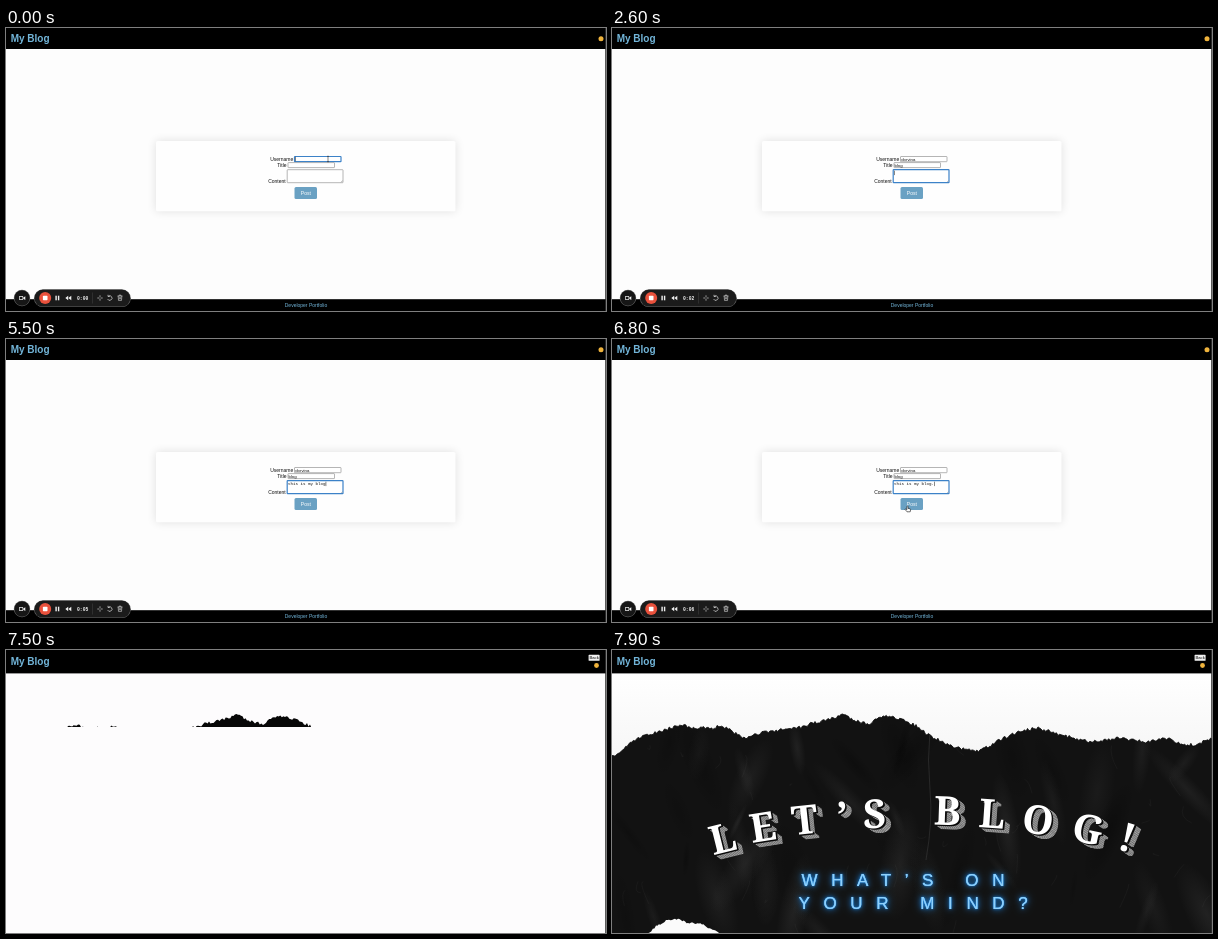
An HTML page with a canvas that plays this animation: 600x283 px, repeating every 8000 ms.

```html
<!DOCTYPE html>
<html lang="en">
<head>
<meta charset="utf-8">
<title>My Blog</title>
<style>
html, body { margin: 0; height: 100%; overflow: hidden; background: #fdfdfd; }
canvas { display: block; width: 600px; height: 283px; }
</style>
</head>
<body>
<canvas id="stage"></canvas>
<script>
const W = 600, H = 283, LOOP = 8000;
const SANS = '"Liberation Sans", Arial, sans-serif';
const MONO = '"Liberation Mono", monospace';
const SERIF = '"Noto Serif", serif';
const BLUE = '#72b5d9';

const canvas = document.getElementById('stage');
const ctx = canvas.getContext('2d');
const scale = window.devicePixelRatio || 1;
canvas.width = W * scale;
canvas.height = H * scale;

function rect(x, y, w, h, color) {
  ctx.fillStyle = color;
  ctx.fillRect(x, y, w, h);
}
function round(x, y, w, h, r, color) {
  ctx.fillStyle = color;
  ctx.beginPath();
  ctx.roundRect(x, y, w, h, r);
  ctx.fill();
}
function disc(x, y, r, color) {
  ctx.fillStyle = color;
  ctx.beginPath();
  ctx.arc(x, y, r, 0, 7);
  ctx.fill();
}
function text(str, x, y, font, color, align = 'left') {
  ctx.font = font;
  ctx.fillStyle = color;
  ctx.textAlign = align;
  ctx.fillText(str, x, y);
}
function stroke(d, color, width) {
  ctx.strokeStyle = color;
  ctx.lineWidth = width;
  ctx.stroke(new Path2D(d));
}
function fill(d, color) {
  ctx.fillStyle = color;
  ctx.fill(new Path2D(d));
}

// ---------- Form page ----------

// keys: time of each typed character; the field has focus from `focus` to `blur`
const fields = [
  { x: 288.5, y: 128.5, w: 46.5, h: 5.2, font: `4.3px ${SANS}`, base: 132.5, pad: 0.7,
    value: 'dorvina', keys: [100, 200, 400, 500, 700, 800, 900], focus: -100, blur: 1300 },
  { x: 282, y: 134.6, w: 46.5, h: 5, font: `4.3px ${SANS}`, base: 138.6, pad: 0.5,
    value: 'blog', keys: [1800, 1900, 2200, 2300], focus: 1300, blur: 2500 },
  { x: 281.2, y: 141.7, w: 55.8, h: 13, font: `4.2px ${MONO}`, base: 146.4, pad: 0.7, area: true,
    value: 'this is my blog.', focus: 2500, blur: 7100,
    keys: [3000, 3100, 3200, 3300, 3500, 3600, 3700, 3900,
           4200, 4300, 4500, 4600, 4700, 5400, 5500, 5600] }
];

function drawField(f, t) {
  const typed = f.keys.filter(k => k <= t);
  const value = f.value.slice(0, typed.length);
  const focused = t >= f.focus && t < f.blur;
  round(f.x, f.y, f.w, f.h, 0.5, '#fff');
  ctx.strokeStyle = focused ? '#3c82c8' : '#858585';
  ctx.lineWidth = focused ? 1.2 : 0.6;
  ctx.stroke(roundPath(f));
  text(value, f.x + f.pad, f.base, f.font, '#111');
  if (f.area) stroke('M334.8 154.2L336.5 152.5M335.9 154.2L336.5 153.6', '#777', 0.4);

  const last = typed.length ? typed[typed.length - 1] : f.focus;
  if (focused && (t - last) % 1000 < 500) {
    rect(f.x + f.pad + ctx.measureText(value).width + 0.1, f.base - 3.7, 0.5, 4.4, '#111');
  }
}
function roundPath(f) {
  const p = new Path2D();
  p.roundRect(f.x, f.y, f.w, f.h, 0.5);
  return p;
}

function drawPointer(t) {
  if (t < 1700) return drawBeam(322, 131);
  if (t < 6400) return;
  const u = Math.min(1, (t - 6400) / 400), e = u * u * (3 - 2 * u);
  const x = 325 - 29.5 * e, y = 146 + 22 * e;
  if (y < 155) drawBeam(x, y);
  else drawHand(x, y);
}
function drawBeam(x, y) {
  stroke(`M${x - 1} ${y - 2.7}h2M${x} ${y - 2.7}v5.4M${x - 1} ${y + 2.7}h2`, '#333', 0.6);
}
function drawHand(x, y) {
  const d = `M${x - 0.6} ${y - 0.6}q.6 -.7 1.2 0v2l2 .5q.6 .2 .5 1l-.4 1.9h-3.2l-1.9 -2.4q.2 -.8 1 -.3l.8 .6z`;
  fill(d, '#fff');
  stroke(d, '#111', 0.6);
}

function drawRecorder(t) {
  disc(16, 270, 8.2, '#777');
  disc(16, 270, 7.7, '#161616');
  round(13, 268, 4.2, 4, 0.8, '#eee');
  round(13.7, 268.7, 2.8, 2.6, 0.4, '#161616');
  fill('M17.3 269.5l2 -1.2v3.6l-2 -1.2z', '#eee');

  round(28, 261.3, 96.8, 17.8, 8.9, '#666');
  round(28.5, 261.8, 95.8, 16.8, 8.4, '#1b1b1b');
  disc(39.2, 270, 6, '#e9513c');
  round(36.9, 267.7, 4.6, 4.6, 0.7, '#fff');
  rect(49.4, 267.7, 1.4, 4.6, '#eee');
  rect(51.9, 267.7, 1.4, 4.6, '#eee');
  fill('M62.2 267.8v4.4l-2.9 -2.2zM65.3 267.8v4.4l-2.9 -2.2z', '#eee');
  text('0:0' + Math.floor(t / 1000), 71, 271.5, `bold 4.7px ${MONO}`, '#eee');
  rect(86, 264.5, 0.5, 11, '#444');
  stroke('M91.3 270h5.4M94 267.3v5.4', '#ccc', 0.7);
  disc(94, 270, 0.9, '#1b1b1b');
  stroke('M102.2 268.3a2.3 2.3 0 1 1 -.6 2.7M102 266.8v1.7h1.8', '#ddd', 0.7);
  stroke('M111.5 268h5M113.1 268v-.9h1.8v.9M112.2 268l.3 4.4h3l.3 -4.4M113.4 269.2v2M114.6 269.2v2', '#ddd', 0.6);
}

function drawForm(t) {
  rect(0, 0, W, H, '#fdfdfd');
  rect(0, 0, W, 21, '#000');
  text('My Blog', 4.7, 13.6, `bold 10px ${SANS}`, BLUE);
  disc(595, 10.7, 2.5, '#efb33c');

  ctx.save();
  ctx.shadowColor = 'rgba(0,0,0,.12)';
  ctx.shadowBlur = 10 * scale;
  round(150, 113, 299.5, 70.3, 1.5, '#fefefe');
  ctx.restore();

  const label = `5px ${SANS}`;
  text('Username', 264.2, 132.8, label, '#111');
  text('Title', 271.3, 138.8, label, '#111');
  text('Content', 262.2, 154.8, label, '#111');
  fields.forEach(f => drawField(f, t));
  round(288.5, 159, 22.5, 12, 1.5, '#6aa1c3');
  text('Post', 299.8, 166.8, label, '#fff', 'center');

  rect(0, 271.2, W, 12, '#000');
  text('Developer Portfolio', 300, 278.6, label, BLUE, 'center');
  drawRecorder(t);
  drawPointer(t);
}

// ---------- Blog page ----------

function seeded(seed) {
  return () => (seed = (seed * 16807) % 2147483647) / 2147483647;
}

// Ragged line through a few points
function tear(points, jitter, rnd) {
  const out = [];
  for (let i = 1; i < points.length; i++) {
    const [x0, y0] = points[i - 1], [x1, y1] = points[i];
    const steps = Math.ceil((x1 - x0) / 1.6);
    for (let s = 0; s < steps; s++) {
      const u = s / steps;
      out.push([x0 + (x1 - x0) * u, y0 + (y1 - y0) * u + (rnd() - 0.5) * jitter]);
    }
  }
  out.push(points[points.length - 1]);
  return out.map(p => p.map(v => v.toFixed(1)).join(' ')).join('L');
}

const rnd = seeded(41);
const ridge = tear([
  [0, 107], [12, 98], [26, 88], [46, 82], [62, 77], [69, 74], [80, 78], [90, 77.5], [98, 79],
  [108, 76], [116, 79], [132, 88], [150, 83], [172, 79], [192, 77], [200, 73], [212, 71],
  [232, 65], [241, 70], [257, 74], [268, 66], [279, 67], [292, 70], [304, 76], [318, 86],
  [345, 98], [368, 101], [390, 89], [408, 81], [426, 78], [446, 84], [478, 92], [506, 88],
  [535, 92], [556, 88], [568, 94], [582, 95], [600, 89]
], 3, rnd);
const scrap = tear([[36, 284], [44, 276], [54, 271], [66, 269], [76, 273], [90, 274], [108, 284]], 2, rnd);
const paper = new Path2D(`M${ridge}V${H}H0Z`);
const ridgeLine = new Path2D('M' + ridge);

const creases = Array.from({ length: 46 }, () => ({
  x: rnd() * W, y: 85 + rnd() * 200, r: 18 + rnd() * 45,
  angle: Math.PI / 2 + (rnd() - 0.5) * 1.6, thin: 0.15 + rnd() * 0.25,
  tone: rnd() < 0.6 ? '70,70,70' : '0,0,0', alpha: 0.12 + rnd() * 0.2
}));
const scratches = Array.from({ length: 40 }, () => {
  const x = rnd() * W, y = 95 + rnd() * 180;
  return `M${x} ${y}q${rnd() * 10 - 5} ${rnd() * 12} ${rnd() * 20 - 10} ${rnd() * 24}`;
}).join('');

const hatch = (() => {
  const tile = document.createElement('canvas');
  tile.width = tile.height = 2;
  const c = tile.getContext('2d');
  c.fillStyle = '#c4c4c4';
  c.fillRect(0, 0, 2, 2);
  c.fillStyle = '#4a4a4a';
  c.fillRect(0, 0, 1, 1);
  c.fillRect(1, 1, 1, 1);
  return ctx.createPattern(tile, 'repeat');
})();

// character, centre x, baseline y, tilt in degrees
const headline = [
  ['L', 114, 202, -14], ['E', 153, 191, -9], ['T', 194, 184, -6], ['’', 231, 180, -3],
  ['S', 263, 178, -1], ['B', 335, 175, 2], ['L', 379, 178, 4], ['O', 424, 184, 8],
  ['G', 473, 193, 12], ['!', 511, 201, 17]
];

function drawLetter([char, x, y, tilt]) {
  const font = `bold 40px ${SERIF}`;
  const at = (offset, color) => {
    ctx.save();
    ctx.translate(x + offset, y + offset * 0.7);
    ctx.rotate(tilt * Math.PI / 180);
    text(char, 0, 0, font, color, 'center');
    ctx.restore();
  };
  for (let d = 6.5; d > 2; d -= 0.5) at(d, hatch);
  at(1.7, '#0a0a0a');
  at(1, '#0a0a0a');
  at(0, '#fff');
}

function drawNeon(str, x, y) {
  ctx.save();
  ctx.letterSpacing = '13.6px';
  ctx.shadowColor = '#1686e8';
  for (const blur of [9, 5, 2]) {
    ctx.shadowBlur = blur * scale;
    text(str, x, y, `17px ${SANS}`, '#8fd0fb');
  }
  ctx.restore();
}

function drawPaper() {
  ctx.save();
  ctx.clip(paper);
  rect(0, 60, W, H, '#121212');
  for (const c of creases) {
    ctx.save();
    ctx.translate(c.x, c.y);
    ctx.rotate(c.angle);
    ctx.scale(1, c.thin);
    const g = ctx.createRadialGradient(0, 0, 0, 0, 0, c.r);
    g.addColorStop(0, `rgba(${c.tone},${c.alpha})`);
    g.addColorStop(1, `rgba(${c.tone},0)`);
    disc(0, 0, c.r, g);
    ctx.restore();
  }
  stroke(scratches, 'rgba(120,120,120,.13)', 0.6);
  stroke('M318 80q-3 30 0 60t-4 70', 'rgba(130,130,130,.2)', 1);
  ctx.restore();
  ctx.strokeStyle = '#0a0a0a';
  ctx.lineWidth = 0.8;
  ctx.stroke(ridgeLine);
  fill(`M${scrap}Z`, '#fbfbfb');
}

function drawBlog(t) {
  rect(0, 0, W, H, '#fdfcfd');
  if (t >= 7800) {
    const sky = ctx.createLinearGradient(0, 23, 0, 105);
    sky.addColorStop(0, '#fff');
    sky.addColorStop(1, '#f6f6f6');
    rect(0, 23, W, 100, sky);
    drawPaper();
    headline.forEach(drawLetter);
    drawNeon('WHAT’S ON', 189.5, 236);
    drawNeon('YOUR MIND?', 186.5, 258.5);
  } else if (t >= 7500) {
    // Only the top rows of the picture have loaded
    ctx.save();
    ctx.beginPath();
    ctx.rect(0, 23, W, 54);
    ctx.clip();
    ctx.fillStyle = '#070707';
    ctx.fill(paper);
    ctx.restore();
  }
  rect(0, 0, W, 23.4, '#000');
  text('My Blog', 4.7, 15, `bold 10px ${SANS}`, BLUE);
  round(582.6, 4.8, 11, 6, 0.6, '#f2f2f2');
  text('Back', 588.1, 9.3, `4.2px ${SANS}`, '#000', 'center');
  disc(590.5, 15.5, 2.4, '#efb33c');
}

let start;
function frame(now) {
  start ??= now;
  const t = (now - start) % LOOP;
  ctx.setTransform(scale, 0, 0, scale, 0, 0);
  if (t < 7400) drawForm(t);
  else drawBlog(t);
  rect(599.2, 0, 0.8, H, '#333');
  requestAnimationFrame(frame);
}
requestAnimationFrame(frame);
</script>
</body>
</html>
```
